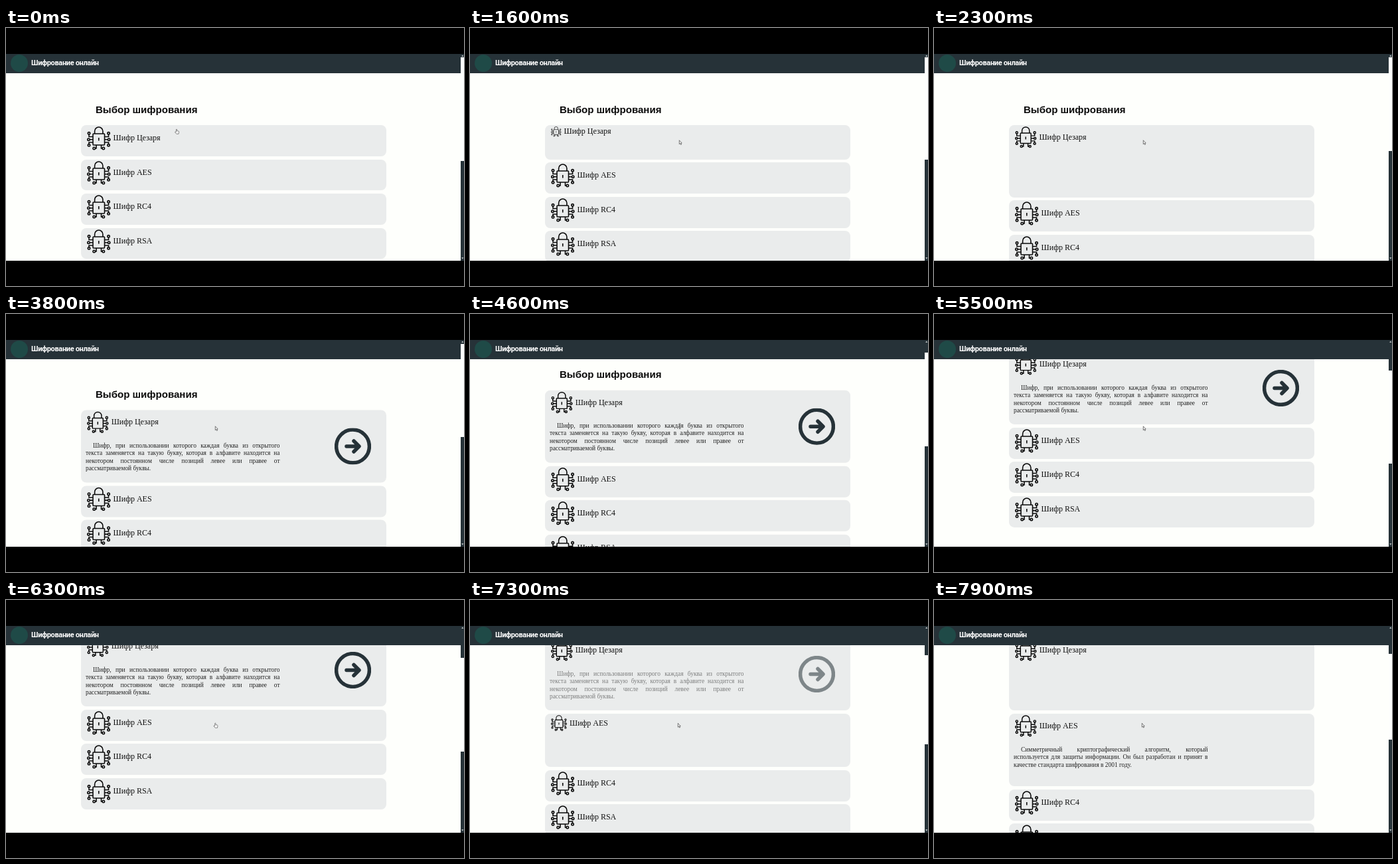
An HTML page for the animation above (8000 ms loop, 690x388 px).

```html
<!DOCTYPE html>
<html lang="ru">
<head>
<meta charset="utf-8">
<title>Шифрование онлайн</title>
<style>
  html, body { margin: 0; width: 100%; height: 100%; overflow: hidden; background: #000; }
  #stage { position: relative; width: 690px; height: 388px; overflow: hidden; background: #000; }
  #view { position: absolute; left: 0; top: 39px; width: 690px; height: 310.5px; overflow: hidden; background: #fefffc; }
  #page, header, header *, h1, .card, .card *, #bar, #bar *, #cursor { position: absolute; }
  #page { left: 0; top: -39px; width: 685px; }
  h1 { left: 135px; top: 0; margin: 0; transform: translateY(113.6px); font: bold 15.05px/18px "Liberation Sans", Arial, sans-serif; color: #0b0b0b; white-space: nowrap; }
  .card { left: 113px; width: 459.5px; border-radius: 8px; background: #eaecec; color: #111; font-family: "Liberation Serif", "Times New Roman", serif; }
  .icon { left: 9px; top: 2px; overflow: visible; }
  .name { font-size: 12px; line-height: 14px; white-space: nowrap; }
  .text { left: 7px; top: 0; width: 292.5px; margin: 0; transform: translateY(48.6px); font-size: 9.4px; line-height: 11.35px; color: #222; text-indent: 11px; text-align: justify; text-align-last: justify; white-space: nowrap; }
  .text span { position: static; display: block; text-indent: 0; }
  .text span:first-child { text-indent: 11px; }
  .text span:last-child { text-align-last: left; }
  .go { left: 381.5px; top: 27px; width: 55px; height: 55px; }
  header { left: 0; top: 0; width: 685px; height: 29px; background: #263238; }
  .badge { left: 7px; top: 1px; width: 26px; height: 26px; border-radius: 50%; background: #1f4a47; }
  .brand { left: 38px; top: 7px; font: bold 11px/13px Roboto, sans-serif; letter-spacing: -.35px; color: #fff; white-space: nowrap; }
  #bar { left: 685px; top: 0; width: 5px; height: 311px; background: #263238; }
  #thumb { left: 0; width: 5px; background: #fdfefd; }
  #bar svg { left: 0; top: 0; }
  #cursor { left: 0; top: 0; overflow: visible; }
</style>
</head>
<body>
<div id="stage">
  <div id="view">
    <div id="page"><h1>Выбор шифрования</h1></div>
    <header><div class="badge"></div><div class="brand">Шифрование онлайн</div></header>
    <div id="bar">
      <div id="thumb"></div>
      <svg width="5" height="310"><path d="M1.2 3.8 2.8 1.8 4.4 3.8ZM1.2 306.2 2.8 308.2 4.4 306.2Z" fill="#dfe3e4"/></svg>
    </div>
  </div>
  <svg id="cursor" width="10" height="12" fill="#fff" stroke="#555" stroke-width=".8" stroke-linejoin="round">
    <path data-kind="arrow" d="M.3.3V6.2L1.7 5 2.6 7 3.5 6.6 2.6 4.6H4.2Z"/>
    <path data-kind="hand" transform="scale(.88)" d="M-.3 5V.6Q.4-.4 1.1.6V3L3.9 3.6Q4.7 3.9 4.5 5L3.9 8.2H.2L-2.3 5.4Q-2.2 4.2-1.2 4.6Z"/>
    <path data-kind="beam" fill="none" d="M-.5-3.5H2.5M1-3.5V4M-.5 4H2.5"/>
  </svg>
</div>
<script>
const LOOP = 8000, SHUT = 46.8, OPEN = 109.2, GAP = 4.7, TOP = 146, OPEN_MS = 900;

const CARDS = [
  { name: 'Шифр Цезаря', click: 1520, close: 7050, lines: [
    'Шифр, при использовании которого каждая буква из открытого',
    'текста заменяется на такую букву, которая в алфавите находится на',
    'некотором постоянном числе позиций левее или правее от',
    'рассматриваемой буквы.'] },
  { name: 'Шифр AES', click: 7020, close: Infinity, lines: [
    'Симметричный криптографический алгоритм, который',
    'используется для защиты информации. Он был разработан и принят в',
    'качестве стандарта шифрования в 2001 году.'] },
  { name: 'Шифр RC4', click: Infinity },
  { name: 'Шифр RSA', click: Infinity }
];

// [time, value...] steps
const SCROLL = [[3700, 0], [3800, 1.5], [4100, 10], [4400, 22], [4600, 31.2], [5100, 66],
  [5400, 85], [5600, 93], [5800, 95], [7030, 95], [7300, 89]];
const POINTER = [[0, 256.5, 152], [500, 315, 168.5], [5900, 315, 168.5], [6300, 315, 185],
  [7000, 315, 185], [7150, 313, 185]];

const half = `<path d="M9 15.5H3V12M9 19.7H4.2M9 24H3V26.6M14 28V33H12.4"/>
  <circle cx="3" cy="10.3" r="1.7"/><circle cx="2.4" cy="19.7" r="1.7"/>
  <circle cx="3" cy="28.3" r="1.7"/><circle cx="10.7" cy="33" r="1.7"/>`;
const lock = `<svg class="icon" viewBox="0 0 35.5 35.5" fill="none" stroke="#0a0a0a" stroke-width="1.6">
  <rect x="9" y="11" width="17.5" height="17" rx="1"/>
  <path d="M11.6 11V7.2a6.15 6.15 0 0 1 12.3 0V11M17.75 17V21.5"/>
  ${half}<g transform="matrix(-1 0 0 1 35.5 0)">${half}</g></svg>`;
const go = `<svg class="go" viewBox="-27.5 -27.5 55 55" fill="none" stroke="#263238" stroke-width="5.5">
  <circle r="24.9"/><path d="M-9.5 0H9M1.5-8 9.5 0 1.5 8" stroke-linecap="round" stroke-linejoin="round"/></svg>`;

const $ = id => document.getElementById(id);
const clamp = x => Math.min(1, Math.max(0, x));

// CSS "ease": cubic-bezier(.25, .1, .25, 1)
function ease(x) {
  if (x <= 0 || x >= 1) return clamp(x);
  let lo = 0, hi = 1, u;
  for (let i = 0; i < 20; i++) {
    u = (lo + hi) / 2;
    const bx = .75 * u * (1 - u) + u ** 3;
    if (bx < x) lo = u; else hi = u;
  }
  return .3 * u * (1 - u) ** 2 + 3 * u * u * (1 - u) + u ** 3;
}

function sample(steps, t, k = 1) {
  const i = steps.findIndex(s => s[0] > t);
  if (i === 0) return steps[0][k];
  if (i < 0) return steps[steps.length - 1][k];
  const a = steps[i - 1], b = steps[i];
  return a[k] + (b[k] - a[k]) * (t - a[0]) / (b[0] - a[0]);
}

for (const c of CARDS) {
  c.el = document.createElement('div');
  c.el.className = 'card';
  const body = c.lines ? `<p class="text">${c.lines.map(s => `<span>${s}</span>`).join('')}</p>${go}` : '';
  c.el.innerHTML = `${lock}<div class="name">${c.name}</div>${body}`;
  for (const part of ['icon', 'name', 'text', 'go']) c[part] = c.el.querySelector('.' + part);
  $('page').append(c.el);
}

function drawCard(c, y, t) {
  const since = t - c.click;
  const h = SHUT + (OPEN - SHUT) * ease(since / OPEN_MS);
  const size = since >= 0 ? h * .298 : 35.5;
  c.el.style.top = y + 'px';
  c.el.style.height = h + 'px';
  c.icon.style.width = c.icon.style.height = size + 'px';
  c.name.style.transform = `translate(${9 + size + 4.1}px, ${2 + size / 2 - 7.4}px)`;
  if (c.lines) {
    const stay = 1 - clamp((t - c.close) / 550);
    c.text.style.opacity = since >= 830 ? stay : 0;
    c.go.style.opacity = clamp((since - 930) / 700) * stay;
  }
  return h;
}

function cursorKind(t, scroll) {
  if (t >= CARDS[1].click) return 'arrow';
  if (t < CARDS[0].click || scroll > 92) return 'hand';
  return scroll > 27 && scroll < 60 ? 'beam' : 'arrow';
}

function render(t) {
  const scroll = sample(SCROLL, t);
  let y = TOP, extra = 0;
  for (const c of CARDS) {
    const h = drawCard(c, y, t);
    y += h + GAP;
    extra += h - SHUT;
  }
  $('page').style.transform = `translateY(${-scroll}px)`;

  const unit = 300 / (596 + extra);
  $('thumb').style.top = 5 + scroll * unit + 'px';
  $('thumb').style.height = 309 * unit + 'px';

  const kind = cursorKind(t, scroll);
  $('cursor').style.transform = `translate(${sample(POINTER, t)}px, ${sample(POINTER, t, 2)}px)`;
  for (const p of $('cursor').children) p.style.display = p.dataset.kind === kind ? '' : 'none';
}

const start = performance.now();
function tick() {
  render((performance.now() - start) % LOOP);
  requestAnimationFrame(tick);
}
tick();
</script>
</body>
</html>
```
